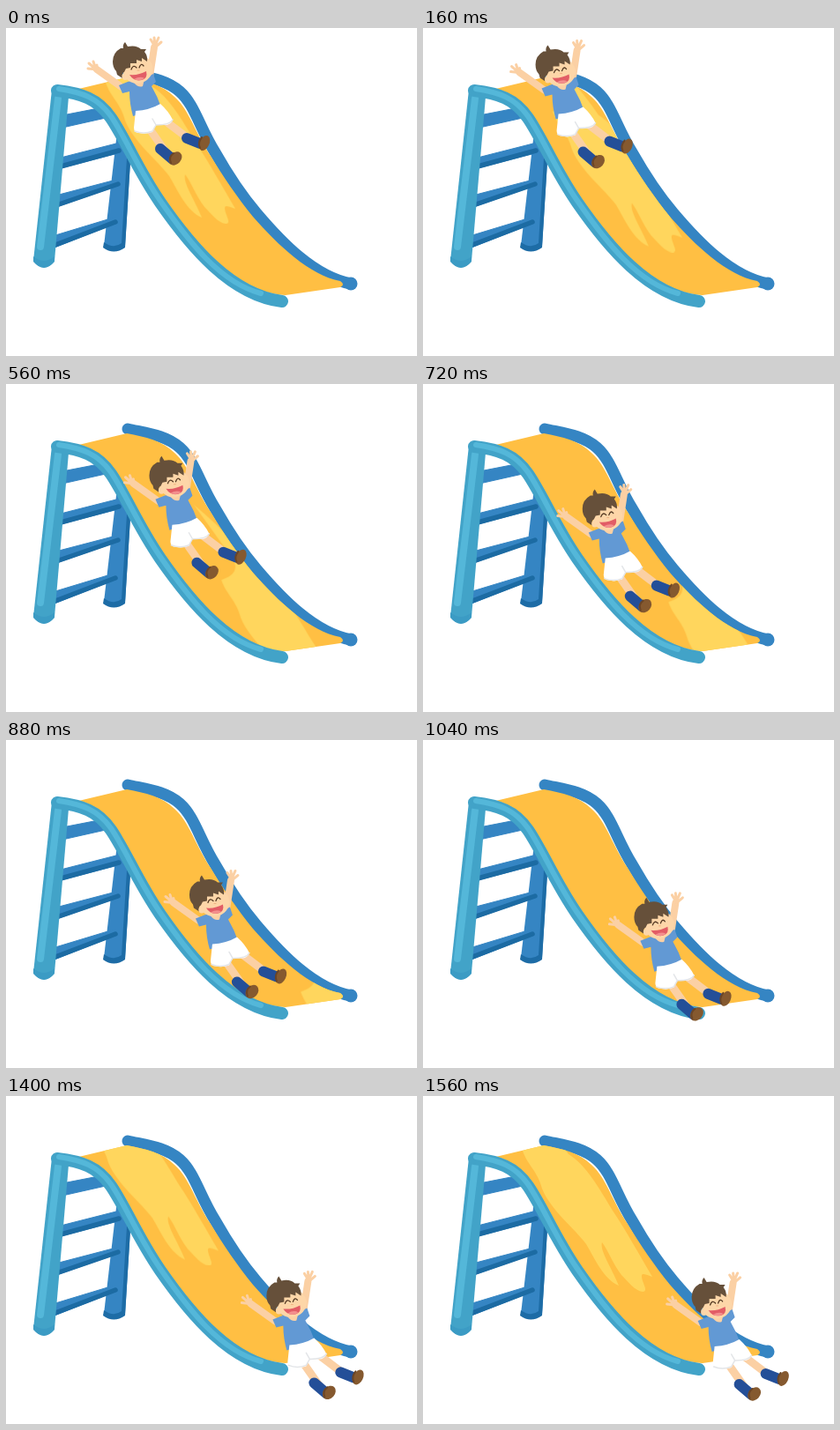
These frames come from a looping animation (466x372 px, 1600 ms). An HTML page without scripts:

```html
<!DOCTYPE html>
<html lang="en">
<head>
<meta charset="utf-8">
<title>Boy on a slide</title>
<style>
  html, body { margin: 0; width: 100%; height: 100%; overflow: hidden; background: #fff; }
  svg { display: block; width: 100%; height: 100%; }
  .line { fill: none; stroke-linecap: round; stroke-linejoin: round; }
  .skin { stroke: #fbd0a4; }

  .boy {
    offset-path: path("M0,0 C10,5 17,10 22,20 C29,34 35,52 42,67 C47,79 52,91 60,104 C76,128 94,147 117,162 C130,170 142,177 155,182 C165,186 174,189 184,190");
    offset-rotate: 0deg;
    animation: ride 1600ms cubic-bezier(.35, 0, .62, 1) infinite;
  }
  .shine { animation: flow 1600ms linear infinite; }

  @keyframes ride {
    from { offset-distance: 0%; }
    to { offset-distance: 100%; }
  }
  @keyframes flow {
    0% { transform: translate(0, 0); animation-timing-function: cubic-bezier(.4, .2, .7, .7); }
    20% { transform: translate(80px, 77px); }
    35% { transform: translate(131px, 160px); }
    45% { transform: translate(165px, 185px); }
    62% { transform: translate(260px, 250px); }
    62.01% { transform: translate(-160px, -240px); }
    66% { transform: translate(-130px, -200px); }
    77.5% { transform: translate(-63px, -98px); animation-timing-function: cubic-bezier(.3, .4, .6, 1); }
    97.5%, 100% { transform: translate(0, 0); }
  }
</style>
</head>
<body>
<svg viewBox="0 0 466 372">
  <defs>
    <path id="bed" d="M74,71 L137,56 C158,60 177,64 191,78 C208,93 214,118 232,145 C246,168 262,192 280,214 C308,246 345,281 379,287 Q385,291 379,294 L317,303 C250,298 205,240 170,188 C145,150 125,85 74,71Z"/>
    <clipPath id="bedClip"><use href="#bed"/></clipPath>
  </defs>

  <!-- ladder -->
  <path fill="#3585c3" d="M126,118 L142,135 L135,247 Q122,258 111,247Z"/>
  <path fill="#1d6ca6" d="M138,132 L142,135 L135,249 Q122,258 110,249 L111,243 Q122,251 131,244Z"/>
  <g class="line" fill="#3585c3" stroke="#3585c3" style="fill: #3585c3">
    <path d="M64,99 L105,91 L113,102 L64,113Z"/>
    <path d="M62,147 L125,131 L131,141 L62,159Z"/>
    <path d="M60,189 L125,172 L129,178 L60,202Z"/>
    <path d="M56,235 L122,215 L126,221 L55,249Z"/>
  </g>
  <g class="line" stroke="#1c6ba3" stroke-width="5.500">
    <path d="M62,157 L128,139"/>
    <path d="M60,200 L127,177"/>
    <path d="M56,246 L124,220"/>
  </g>
  <path fill="#42a3c8" d="M52,70 L71,78 L55,264 Q43,279 31,264Z"/>
  <path class="line" stroke="#54b7d9" stroke-width="8" d="M59,80 L39,248"/>
  <path fill="#3b9bc4" d="M31,259 Q43,269 55,259 L55,265 Q43,279 31,265Z"/>

  <!-- slide -->
  <path class="line" stroke="#3585c3" stroke-width="13" d="M138,51 C160,56 181,58 197,72 C214,87 219,112 237,141 C250,164 266,189 284,210 C312,243 349,282 391,290"/>
  <circle cx="391" cy="290" r="7.500" fill="#3585c3"/>
  <use href="#bed" fill="#ffbf43"/>
  <g clip-path="url(#bedClip)">
    <path class="shine" fill="#ffd65d" d="M113,62 C125,58 138,50 120,30 L82,-23 C115,5 145,35 165,66 C185,78 200,105 215,130 C230,152 245,180 260,205 C256,204 250,200 248,203 C247,210 257,222 249,222 C240,221 232,210 225,203 C215,190 210,175 203,166 C200,175 214,195 222,215 C205,208 195,185 185,168 C172,150 145,130 135,105 C130,85 118,78 113,62Z"/>
  </g>
  <g class="line">
    <path stroke="#42a3c8" stroke-width="14" d="M58,71 C85,74 104,80 119,102 C136,127 150,162 175,198 C209,247 255,303 313,310"/>
    <path stroke="#54b7d9" stroke-width="6" d="M60,69 C86,73 104,79 119,100 C136,125 150,160 175,196 C207,242 243,289 289,301"/>
  </g>

  <g class="boy">
    <!-- limbs -->
    <g class="line skin">
      <path stroke-width="8" d="M131,67 L103,47 M163,55 L168,22"/>
      <path stroke-width="3" d="M102,47 L93,46 M102,47 L94,40 M102,47 L99,38 M103,47 L103,42 M169,21 L164,13 M169,20 L168,11 M169,20 L173,11 M169,22 L176,16"/>
      <path stroke-width="9" d="M161,112 L180,139 M180,105 L209,127"/>
    </g>
    <g class="line" stroke="#244f98" stroke-width="12" stroke-linecap="butt">
      <path d="M175,137 L189,149"/>
      <path d="M205,125 L220,131"/>
    </g>
    <g fill="#85592f">
      <ellipse cx="192" cy="148" rx="8.500" ry="6.500" transform="rotate(-48 192 148)"/>
      <ellipse cx="225" cy="130.500" rx="9" ry="5.500" transform="rotate(-65 225 130.500)"/>
    </g>
    <g class="line" stroke="#6b4526" stroke-width="2">
      <path d="M187,153 Q184,146 190,142"/>
      <path d="M220,136 Q217,130 222,124"/>
    </g>

    <!-- clothes -->
    <path fill="#6299d4" d="M128,65 L138,61 L161,55 L167,52 L170,61 L165,66 Q172,78 176,90 L144,100 Q140,86 140,72 L132,74Z"/>
    <path fill="#fff" d="M147,94 Q163,93 175,86 Q184,94 189,104 Q187,110 180,110 L170,110 L166,118 Q158,121 151,119 Q145,119 145,113Z"/>
    <path class="line" stroke="#e3e5e8" stroke-width="1.500" d="M189,104 Q186,110 170,110 L166,117 Q156,121 146,117 M170,110 L166,103"/>
    <path fill="#fbd0a4" d="M145,62 L157,58 L155,66 Q150,68 145,62Z"/>

    <!-- head -->
    <ellipse cx="149.500" cy="47" rx="17" ry="15.500" fill="#fdd6a8" transform="rotate(-18 149.500 47)"/>
    <path fill="#66503a" d="M132,57 L126,53 L125,49 Q121,45 121,38 Q121,28 130,23 L133,23 Q132,19 135,16 L138,21 Q148,19 153,24 L159,24 L157,27 Q161,32 160,38 L154,34 L154,38 L148,36 L148,40 L141,40 L141,45 L136,46 L134,50 Q131,51 132,57Z"/>
    <ellipse cx="135" cy="55" rx="3.500" ry="4" fill="#fdd6a8"/>
    <path class="line" stroke="#523822" stroke-width="1.300" d="M142,47 Q144,41 148,45 M151,45 Q153,39 156,43"/>
    <path class="line" stroke="#efb180" stroke-width="1" d="M149,48 L151,48"/>
    <path fill="#e25d66" d="M140,53 Q150,54 159,49 Q161,57 154,59 Q145,61 140,53Z"/>
    <path fill="#f3908e" d="M145,58 Q152,54 157,57 Q152,61 145,58Z"/>
  </g>
</svg>
</body>
</html>
```
